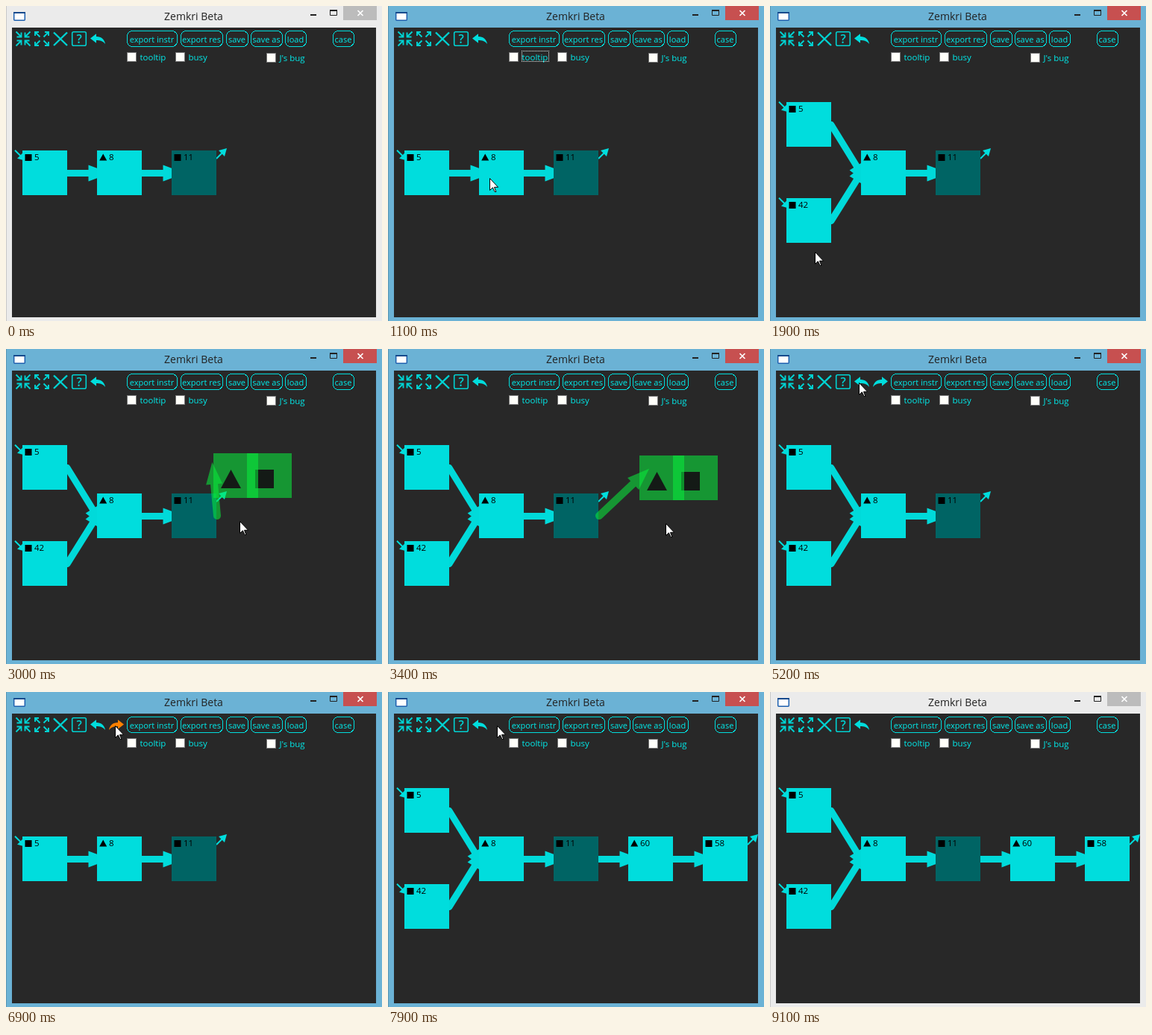
Write an HTML page that moves like this. It is 504 by 423 pixels and loops after 9200 ms.

```html
<!DOCTYPE html>
<html lang="en">
<head>
<meta charset="utf-8">
<title>Zemkri Beta</title>
<style>
  html, body { margin: 0; width: 100%; height: 100%; overflow: hidden; background: #282828; }
  svg { display: block; width: 504px; height: 423px; }
  text { font-family: "Open Sans", "Noto Sans", sans-serif; }
  .crisp { shape-rendering: crispEdges; }
</style>
</head>
<body>
<svg id="stage" viewBox="0 0 504 423" xmlns="http://www.w3.org/2000/svg">
  <rect id="frame" width="504" height="423"/>
  <rect x="8" y="29" width="488" height="389" fill="#282828"/>
  <path d="M.5 0V423" stroke="#000" stroke-opacity=".15"/>
  <rect x="10.7" y="8.7" width="14.6" height="10.6" rx="1" fill="#fff" stroke="#1d5fae" stroke-width="1.5"/>
  <path d="M10 9H26" stroke="#174a8c" stroke-width="2"/>
  <text x="251.5" y="19" font-size="14" text-anchor="middle" fill="#222">Zemkri Beta</text>
  <path d="M408 12H416" stroke="#222" stroke-width="2"/>
  <path d="M434.5 6V12.5H443.5V6" fill="none" stroke="#222"/>
  <path d="M434 6H444" stroke="#222" stroke-width="2"/>
  <rect id="close" x="452" width="45" height="19"/>
  <path d="M471.5 6L478.5 13M478.5 6L471.5 13" stroke="#fff" stroke-width="1.7"/>
  <g id="tools"></g>
  <g id="graph"></g>
  <g id="overlay"></g>
  <rect id="focus" class="crisp" x="179.5" y="60.5" width="36" height="14" fill="none" stroke="#e8f4f4" stroke-dasharray="1 1" stroke-dashoffset=".5"/>
  <path id="undo" d="M113 43.5L121 37.3V41C128 41 132 45 133 51C130 47 126 46 121 46V49.7Z"/>
  <path id="redo" transform="translate(271 0) scale(-1 1)" d="M113 43.5L121 37.3V41C128 41 132 45 133 51C130 47 126 46 121 46V49.7Z"/>
  <path id="cursor" d="M.5 .5V16.5L4.3 12.8L7.1 18.5H8.9L6.5 12.3H11.6Z" fill="#fff" stroke="#000" stroke-width="1"/>
</svg>
<script>
const LOOP = 9200, TICK = 100;
const CYAN = '#00dddd', ICON = '#00d2d2', LABEL = '#00ecec';
const DARK = '#006464', ORANGE = '#ff8000', GREEN = '#08f03c';
const $ = id => document.getElementById(id);

// Toolbar
const BUTTONS = [['export instr', 162, 230], ['export res', 234, 291], ['save', 295, 325],
  ['save as', 328, 371], ['load', 374, 403], ['case', 438, 467]];
const CHECKS = [['tooltip', 162, 63], ['busy', 227, 63], ["J's bug", 349, 64]];

const button = ([label, a, b]) =>
  `<rect class="crisp" x="${a + .5}" y="33.5" width="${b - a - 1}" height="21" rx="7" fill="none" stroke="${CYAN}"/>
   <text x="${(a + b) / 2 - .5}" y="49" font-size="11" text-anchor="middle" fill="${LABEL}">${label}</text>`;

const check = ([label, x, y]) =>
  `<rect x="${x + .5}" y="${y - .5}" width="12" height="12" fill="#fffffa" stroke="#777"/>
   <text x="${x + 17.5}" y="${y + 10}" font-size="11.5" fill="${LABEL}">${label}</text>`;

const corners = (cx, cy, d) => [[1, 1], [-1, 1], [1, -1], [-1, -1]].map(([sx, sy]) =>
  `<path transform="translate(${cx} ${cy}) scale(${sx} ${sy})" d="${d}"/>`).join('');

$('tools').innerHTML = `<g fill="none" stroke="${ICON}" stroke-width="1.9">
  ${corners(23, 44, 'M9.5 9.5L2.5 2.5M2.5 8.5V2.5H8.5')}
  ${corners(48, 44, 'M2.5 2.5L9 9M4 9H9V4')}
  <path d="M64 35.5L82 53M82 35.5L64 53" stroke-width="2.4"/>
  <rect x="88.7" y="34.7" width="18.6" height="18.6" rx="2" stroke-width="1.6"/></g>
  <text x="98" y="50" font-size="16" font-weight="600" text-anchor="middle" fill="${ICON}">?</text>`
  + BUTTONS.map(button).join('') + CHECKS.map(check).join('');

// Graph parts
const tri = (x, y, w, h) => `<path d="M${x + w / 2} ${y}L${x + w} ${y + h}H${x}Z"/>`;
const box = (x, y, s) => `<rect x="${x}" y="${y}" width="${s}" height="${s}"/>`;

const node = (x, y, label, kind, fill = CYAN) =>
  `<rect x="${x}" y="${y}" width="60" height="60" fill="${fill}"/>
   ${kind === 'tri' ? tri(x + 3.2, y + 4.5, 10, 9) : box(x + 3.5, y + 5, 9)}
   <text x="${x + 16}" y="${y + 13}" font-size="11.5">${label}</text>`;

function link(x1, y1, x2, y2, color = '#00dada', opacity = 1, width = 9) {
  const turn = Math.atan2(y2 - y1, x2 - x1) * 180 / Math.PI;
  return `<g opacity="${opacity}"><path d="M${x1} ${y1}L${x2} ${y2}" stroke="${color}" stroke-width="${width}" stroke-linecap="round"/>
    <path transform="translate(${x2} ${y2}) rotate(${turn})" d="M-11.5 -11L18 0L-11.5 11Z" fill="${color}"/></g>`;
}

const pin = (x, y, turn) =>
  `<g transform="translate(${x} ${y}) rotate(${turn})" fill="${CYAN}">
   <path d="M0 -1H11V1H0Z"/><path d="M9.9 -5.6L19.8 0L9.9 5.6Z"/></g>`;
const pinIn = y => pin(12, y - .3, 45);
const pinOut = x => pin(x, 205, -45);

function graph(level) {
  const mid = 224.5;
  const links = [link(182, mid, 222, mid)], nodes = [];
  if (level) {
    links.push(pinIn(129), pinIn(258), link(82, 159.5, 122, mid), link(82, 288.5, 122, mid));
    nodes.push(node(22, 129, 5), node(22, 258, 42));
  } else {
    links.push(pinIn(194), link(82, mid, 122, mid));
    nodes.push(node(22, 194, 5));
  }
  nodes.push(node(122, 194, 8, 'tri'), node(222, 194, 11, 'box', DARK));
  if (level > 1) {
    links.push(link(282, mid, 322, mid), link(382, mid, 422, mid), pinOut(482));
    nodes.push(node(322, 194, 60, 'tri'), node(422, 194, 58));
  } else links.push(pinOut(282));
  return links.join('') + nodes.join('');
}

// Drag feedback
const ghost = (x, y, kind) =>
  `<rect x="${x}" y="${y}" width="60" height="60" fill="${GREEN}" opacity=".55"/>
   <g fill="#141a16">${kind === 'tri' ? tri(x + 10, y + 22, 27, 25) : box(x + 11, y + 22, 25)}</g>`;

const ring = x => `<rect x="${x}" y="194" width="60" height="60" fill="none" stroke="${GREEN}" stroke-width="10" opacity=".55"/>`;

function overlay(t, [cx, cy]) {
  const x = cx - 35, y = cy - 91;
  if (t >= 1300 && t < 1400) return ring(122);
  if (t >= 1400 && t < 1900) return ghost(x, y) + link(x + 60, y + 30, 122, 224, GREEN, .55, 10);
  if (t >= 2700 && t < 2900) return ring(222);
  if (t >= 2900 && t < 3500)
    return ghost(x + 45, y) + ghost(x, y, 'tri') + link(283, 224, x, y + 30, GREEN, .55, 10);
  return '';
}

// Timeline
const PATH = [[300, 345, 10], [1100, 136, 231], [1300, 133, 234], [1900, 60, 330], [2000, 60, 330],
  [2600, 262, 231], [2800, 262, 231], [3000, 313, 231], [3500, 382, 234], [3700, 382, 234],
  [4300, 114, 50], [4700, 119, 45], [6400, 119, 45], [6700, 146, 45], [8200, 146, 45], [8800, 504, 28]];
const LEVELS = [[0, 0], [1900, 1], [3500, 2], [5200, 1], [6000, 0], [7100, 1], [7900, 2]];

function cursorAt(t) {
  const i = PATH.findIndex(p => p[0] >= t);
  if (i < 1) return PATH[i < 0 ? PATH.length - 1 : 0].slice(1);
  const [t0, x0, y0] = PATH[i - 1], [t1, x1, y1] = PATH[i];
  const k = (t - t0) / (t1 - t0), e = (k + k * k * (3 - 2 * k)) / 2;
  return [Math.round(x0 + (x1 - x0) * e), Math.round(y0 + (y1 - y0) * e)];
}

const within = (t, ...spans) => spans.some(([a, b]) => t >= a && t < b);
const show = (id, on) => $(id).setAttribute('visibility', on ? 'visible' : 'hidden');

let lastTick = -1, lastLevel = -1;
function render(t) {
  const active = within(t, [400, 9100]), pos = cursorAt(t);
  const level = LEVELS.filter(s => s[0] <= t).pop()[1];
  if (level !== lastLevel) $('graph').innerHTML = graph(lastLevel = level);
  $('overlay').innerHTML = overlay(t, pos);
  $('frame').setAttribute('fill', active ? '#6bb2d5' : '#ebebeb');
  $('close').setAttribute('fill', active ? '#c75050' : '#bcbcbc');
  $('undo').setAttribute('fill', within(t, [5000, 5200], [5800, 6000]) ? ORANGE : CYAN);
  $('redo').setAttribute('fill', within(t, [6900, 7100], [7600, 7900]) ? ORANGE : CYAN);
  $('cursor').setAttribute('transform', `translate(${pos})`);
  show('redo', within(t, [5200, 7900]));
  show('focus', within(t, [400, 1300]));
  show('cursor', within(t, [400, 8800]));
}

const start = performance.now();
function loop() {
  const t = (performance.now() - start) % LOOP;
  const tick = Math.floor(t / TICK);
  if (tick !== lastTick) render((lastTick = tick) * TICK);
  requestAnimationFrame(loop);
}
loop();
</script>
</body>
</html>
```
